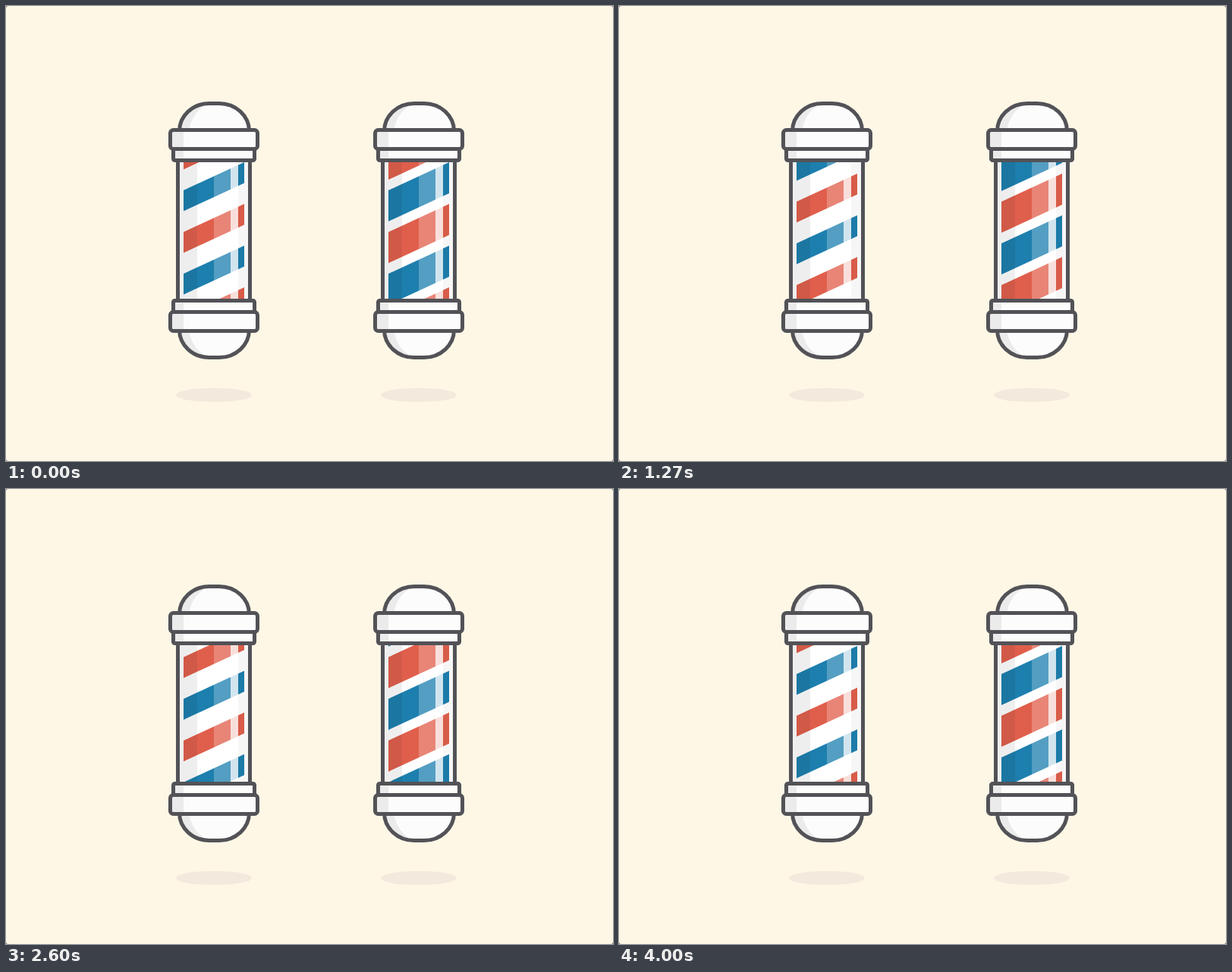
An HTML page for the animation above (4070 ms loop, 800 by 600 pixels).

```html
<!DOCTYPE html>
<html lang="en">
<head>
<meta charset="utf-8">
<title>Barber poles</title>
<style>
  html, body { margin: 0; width: 100%; height: 100%; overflow: hidden; background: #77746c; }
  svg { display: block; width: 800px; height: 600px; background: #fef7e6; border-radius: 3px; }
  .line { fill: none; stroke: #525257; stroke-width: 5; stroke-linejoin: round; }
  .white { fill: #fcfcfc; }
  .shade { fill: #ebebeb; }
</style>
</head>
<body>
<svg id="stage" viewBox="0 0 800 600">
  <defs>
    <clipPath id="window"><rect x="-40" y="204" width="80" height="184"/></clipPath>
    <g id="dome">
      <path class="white" d="M-45.500 165A39.500 36.500 0 0 1 -6 128.500H7A39.500 36.500 0 0 1 46.500 165Z"/>
      <path class="shade" d="M-45.500 165A39.500 36.500 0 0 1 -6 128.500Q-29 138 -33 165Z"/>
      <path class="line" d="M-45.500 165A39.500 36.500 0 0 1 -6 128.500H7A39.500 36.500 0 0 1 46.500 165"/>
    </g>
    <g id="cap">
      <use href="#dome"/>
      <rect class="white" x="-53.500" y="188" width="107" height="15.500" rx="2"/>
      <rect class="shade" x="-53.500" y="188" width="13.500" height="15.500"/>
      <rect class="line" x="-53.500" y="188" width="107" height="15.500" rx="2"/>
      <rect class="white" x="-57.500" y="163.500" width="115" height="25" rx="4"/>
      <path class="shade" d="M-40 163.500H-53.500a4 4 0 0 0 -4 4v17a4 4 0 0 0 4 4H-40Z"/>
      <rect class="line" x="-57.500" y="163.500" width="115" height="25" rx="4"/>
    </g>
    <g id="glass">
      <rect x="-47" y="204" width="25" height="184" fill="#000" opacity=".065"/>
      <rect x="0" y="204" width="22" height="184" fill="#fff" opacity=".24"/>
      <rect x="22" y="204" width="10" height="184" fill="#fff" opacity=".8"/>
      <rect x="32" y="204" width="15" height="184" fill="#000" opacity=".035"/>
      <path class="line" d="M-47.500 204V388M47.500 204V388"/>
    </g>
  </defs>
</svg>
<script>
  const LOOP = 4070, FPS = 15;
  const PITCH = 55, RISE = 37, STEP = 221 / 60, START = 243;
  const BLUE = '#1d7fae', RED = '#e05f4c';
  const stage = document.getElementById('stage');

  function stripes(thick) {
    let out = '';
    for (let i = -4; i <= 4; i++) {
      const y = START + i * PITCH;
      out += `<path fill="${i % 2 ? RED : BLUE}" d="M-40 ${y}L40 ${y - RISE}v${thick}L-40 ${y + thick}Z"/>`;
    }
    return out;
  }

  function pole(x, thick) {
    return `<g transform="translate(${x} 0)">
      <rect x="-50" y="504" width="100" height="18" rx="43" ry="9" fill="#f3eadd"/>
      <rect x="-47" y="204" width="94" height="184" fill="#fff"/>
      <g clip-path="url(#window)"><g class="spin">${stripes(thick)}</g></g>
      <use href="#glass"/>
      <use href="#cap"/>
      <use href="#cap" transform="matrix(1 0 0 -1 0 592)"/>
    </g>`;
  }

  stage.insertAdjacentHTML('beforeend', pole(274, 27.5) + pole(544, 41));
  const spins = stage.querySelectorAll('.spin');
  const began = performance.now();

  function draw() {
    const t = (performance.now() - began) % LOOP;
    const tick = Math.min(60, Math.floor((t + 5) * FPS / 1000));
    const shift = (tick * STEP) % (2 * PITCH);
    spins.forEach(s => s.setAttribute('transform', `translate(0 ${shift})`));
    requestAnimationFrame(draw);
  }
  draw();
</script>
</body>
</html>
```
